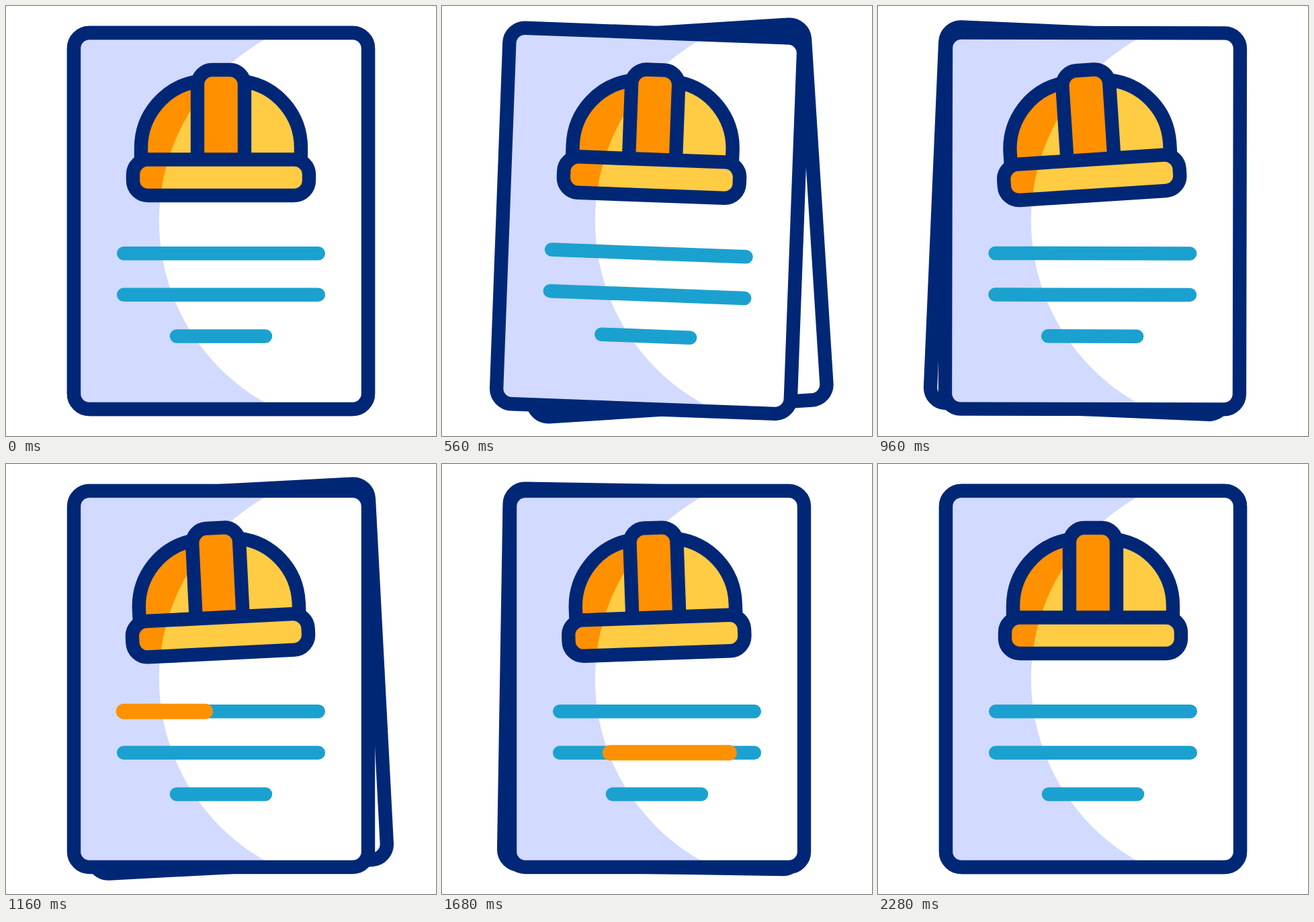
Animation, 640 px wide and 640 px high, one loop 2.88 s. Source, as an HTML page:

```html
<!DOCTYPE html>
<html lang="en">
<head>
<meta charset="utf-8">
<title>Safety document</title>
<style>
  html, body { margin: 0; width: 100%; height: 100%; overflow: hidden; background: #fff; }
  svg { display: block; width: 100vw; height: 100vh; }
  .outline { fill: none; stroke: #002776; stroke-width: 20.4; }
  .lit { fill: #ffcc44; }
  .dark { fill: #ff9100; }
  .text { stroke: #1ba1cf; stroke-width: 20.5; stroke-linecap: round; }
  .sweep { stroke: #ff9100; stroke-width: 23; stroke-linecap: round; }
</style>
</head>
<body>
<svg viewBox="0 0 640 640">
  <defs>
    <rect id="sheet" x="101" y="40" width="438" height="560" rx="23"/>
    <path id="dome" d="M201 228V211A100 100 0 0 1 285 112.3H355A100 100 0 0 1 439 211V228Z"/>
    <path id="strap" d="M285 228V117a22 22 0 0 1 22-22h26a22 22 0 0 1 22 22V228"/>
    <rect id="brim" x="189" y="228.5" width="262" height="53.5" rx="22"/>
    <circle id="light" cx="538.5" cy="320" r="310.7"/>
    <clipPath id="inSheet"><use href="#sheet"/></clipPath>
    <clipPath id="inHelmet"><use href="#dome"/><use href="#brim"/></clipPath>
  </defs>

  <g id="back">
    <use href="#sheet" fill="#fff"/>
    <use href="#sheet" class="outline"/>
  </g>

  <g id="front">
    <use href="#sheet" fill="#d2daff"/>
    <g clip-path="url(#inSheet)"><use id="sheetLight" href="#light" fill="#fff"/></g>
    <use href="#sheet" class="outline"/>
    <g id="lines"></g>
    <g id="helmet">
      <use href="#dome" class="dark"/>
      <use href="#brim" class="dark"/>
      <g clip-path="url(#inHelmet)"><use id="helmetLight" href="#light" class="lit"/></g>
      <path class="outline" d="M201 228V211A100 100 0 0 1 285 112.3M355 112.3A100 100 0 0 1 439 211V228"/>
      <use href="#strap" class="dark"/>
      <use href="#strap" class="outline"/>
      <use href="#brim" class="outline"/>
    </g>
  </g>
</svg>
<script>
const LOOP = 2880, STEP = 40;

// Swings as [time in ms, angle in degrees]
const FRONT = [[15, 0], [352, -4], [655, 4], [994, 0]];
const BACK = [[160, 0], [520, -4], [840, 5], [1160, -3], [1480, 3], [1800, 0]];
const HELMET = [[20, 0], [400, -8], [720, 8], [1040, -6], [1360, 4], [1680, -2], [2000, 0]];

// Highlight sweep over the text lines
const SWEEP = { start: 1053, stagger: 441, length: 240, lag: 106 };
const ROWS = [[175.2, 464.8, 368.2], [175.2, 464.8, 429.8], [254, 386, 491.5]];

const $ = id => document.getElementById(id);
const clamp = x => Math.min(1, Math.max(0, x));
const ease = x => { const p = clamp(x); return p * p * (3 - 2 * p); };
const turn = (a, y) => `rotate(${a} 320 ${y})`;
const SHEET_Y = 40, HELMET_Y = 275;

function swing(keys, t) {
  let value = keys[0][1];
  for (let i = 1; i < keys.length; i++) {
    const [t0, a] = keys[i - 1], [t1, b] = keys[i];
    if (t >= t0) value = a + (b - a) * ease((t - t0) / (t1 - t0));
  }
  return value;
}

function addLine(cls, x1, x2, y) {
  const el = document.createElementNS('http://www.w3.org/2000/svg', 'line');
  const attrs = { class: cls, x1, x2, y1: y, y2: y };
  for (const k in attrs) el.setAttribute(k, attrs[k]);
  $('lines').append(el);
  return el;
}

ROWS.forEach(row => addLine('text', ...row));
const sweeps = ROWS.map(row => addLine('sweep', ...row));

function draw(t) {
  const front = swing(FRONT, t), helmet = swing(HELMET, t);
  $('back').setAttribute('transform', turn(swing(BACK, t), SHEET_Y));
  $('front').setAttribute('transform', turn(front, SHEET_Y));
  $('helmet').setAttribute('transform', turn(helmet, HELMET_Y));

  // The light stays still on the stage while the shapes turn
  $('sheetLight').setAttribute('transform', turn(-front, SHEET_Y));
  $('helmetLight').setAttribute('transform', turn(-helmet, HELMET_Y) + turn(-front, SHEET_Y));

  sweeps.forEach((el, i) => {
    const [x1, x2] = ROWS[i];
    const time = t - SWEEP.start - i * SWEEP.stagger;
    const head = ease(time / SWEEP.length);
    const tail = ease((time - SWEEP.lag) / SWEEP.length);
    el.setAttribute('x1', x1 + (x2 - x1) * tail);
    el.setAttribute('x2', x1 + (x2 - x1) * head);
    el.style.display = head > 0 && tail < 0.995 ? '' : 'none';
  });
}

const begin = performance.now();
function tick() {
  const t = (performance.now() - begin) % LOOP;
  draw(Math.floor(t / STEP) * STEP);
  requestAnimationFrame(tick);
}
tick();
</script>
</body>
</html>
```
